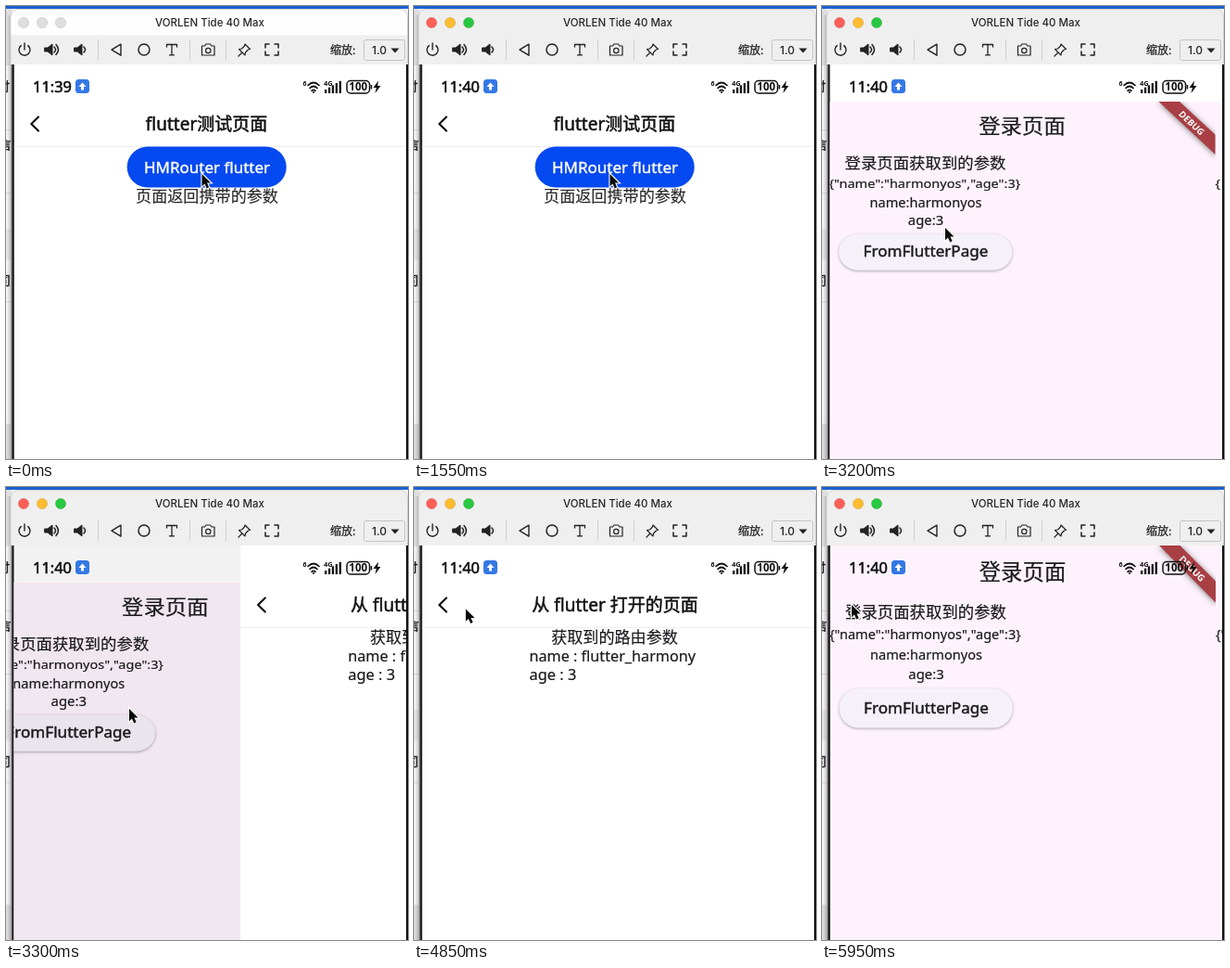
An HTML page with a canvas that plays this animation: 434 by 488 pixels, repeating every 6 s.

```html
<!DOCTYPE html>
<html lang="zh">
<head>
<meta charset="utf-8">
<title>Router demo</title>
<style>
  html, body { margin: 0; width: 100%; height: 100%; overflow: hidden; background: #fff; }
  canvas { display: block; width: 434px; height: 488px; }
</style>
</head>
<body>
<canvas id="stage" width="434" height="488"></canvas>
<script>
const c = document.getElementById('stage').getContext('2d');
const LOOP = 6000, LEFT = 8.5, RIGHT = 432, TOP = 63, W = RIGHT - LEFT;
const SANS = '"Noto Sans", "Noto Sans CJK SC", "Noto Sans CJK", sans-serif';
const UI = 'Inter, "Noto Sans CJK SC", "Noto Sans CJK", sans-serif';
const INK = '#1b1b1d', PINK = '#fef3fd';

const clamp = v => Math.max(0, Math.min(1, v));
const ease = p => p < 0.5 ? 4 * p ** 3 : 1 - (2 - 2 * p) ** 3 / 2;
const span = (t, from, to) => ease(clamp((t - from) / (to - from)));

// heft thickens the letters where the font has no medium weight
function text(s, x, y, size, { color = INK, weight = 400, heft = 0, align = 'left', font = SANS } = {}) {
  c.font = `${weight} ${size}px ${font}`;
  c.fillStyle = c.strokeStyle = color;
  c.textAlign = align;
  c.fillText(s, x, y);
  if (heft) {
    c.lineWidth = heft;
    c.lineJoin = 'round';
    c.strokeText(s, x, y);
  }
}

function rect(x, y, w, h, color) {
  c.fillStyle = color;
  c.fillRect(x, y, w, h);
}

function box(x, y, w, h, r, fill, stroke) {
  c.beginPath();
  c.roundRect(x, y, w, h, r);
  if (fill) { c.fillStyle = fill; c.fill(); }
  if (stroke) { c.strokeStyle = stroke; c.stroke(); }
}

function disc(x, y, r, color, edge) {
  c.beginPath();
  c.arc(x, y, r, 0, 7);
  c.fillStyle = color;
  c.fill();
  if (edge) { c.strokeStyle = edge; c.stroke(); }
}

function path(d, stroke, width = 1.4, fill) {
  const p = new Path2D(d);
  if (fill) { c.fillStyle = fill; c.fill(p); }
  if (stroke) {
    c.strokeStyle = stroke;
    c.lineWidth = width;
    c.stroke(p);
  }
}

function desktop() {
  rect(0, 0, 434, 488, '#f5f5f5');
  rect(0, 0, 434, 3, '#1a62d2');
  rect(0, 3, 6, 61, '#dedede');
  rect(0, 240, 6, 33, '#e6e6e6');
  rect(0, 450, 6, 38, '#dddddd');
  for (const y of [133, 201, 318]) rect(0, y, 5, 1, '#dcdcdc');
  text('时', -9, 91, 13, { heft: 0.4 });
  text('言', -7, 153.5, 13, { heft: 0.4 });
  text('司', -8, 300, 13, { heft: 0.4 });
  const g = c.createLinearGradient(1, 0, 6, 0);
  g.addColorStop(0, 'rgba(0,0,0,0)');
  g.addColorStop(1, 'rgba(0,0,0,.22)');
  rect(1, 10, 5, 478, g);
}

function speaker(x, loud) {
  path(`M${x - 7} 45h3l5-4v12l-5-4h-3z`, '#222', 1, '#222');
  path(`M${x + 3} 44q3 3 0 6`, '#222', 1.5);
  if (loud) path(`M${x + 5} 41.5q5 5.5 0 11`, '#222', 1.5);
}

function toolbar(active) {
  c.lineWidth = 1;
  box(5, 3.5, 428.5, 70, 8, '#f0efef', '#d0d0d0');
  if (!active) box(5.5, 4, 427.5, 27.5, [8, 8, 0, 0], '#fefefe');
  c.lineWidth = 0.8;
  const lights = active ? ['#fe5f57', '#febc2e', '#28c840'] : ['#dedede', '#dedede', '#dedede'];
  lights.forEach((color, i) => disc(19 + 20 * i, 18, 5.7, color, 'rgba(0,0,0,.12)'));
  text('VORLEN Tide 40 Max', 220, 22, 11.5, { weight: 500, align: 'center', font: UI, color: '#262626' });

  c.lineCap = c.lineJoin = 'round';
  path('M16.2 42.6a6 6 0 1 0 7.6 0M20 40v7', '#222');
  speaker(49, true);
  speaker(81, false);
  for (const x of [99, 198, 237]) rect(x, 36, 1, 22, '#cecece');
  path('M114 47.2l10-6v12z', '#222');
  path('M155 47a6 6 0 1 0-12 0a6 6 0 1 0 12 0', '#222', 1.5);
  path('M173.5 44v-2.500h11v2.500M179 41.500v11M176.500 52.800h5', '#222', 1.3);
  path('M211.500 43h3l1.500-2h4.500l1.500 2h3v10h-13.500zM221 48a2.700 2.700 0 1 0-5.400 0a2.700 2.700 0 1 0 5.400 0', '#222', 1.2);
  path('M258 41l5.500 5.500l-2 .5l-3 3l-.5 3l-6.500-6.500l3-.5l3-3zM255 50l-4 4', '#222', 1.2);
  path('M280 45v-4h4M290 41h4v4M294 49v4h-4M284 53h-4v-4', '#222', 1.5);
  text('缩放:', 350, 51.5, 12, { font: UI, color: '#222', heft: 0.25 });
  c.lineWidth = 1;
  box(386.5, 36.5, 44, 22, 2, '#efefef', '#c4c4c4');
  text('1.0', 395, 52, 12, { font: UI, color: '#222', weight: 500 });
  path('M415.500 45.500h9l-4.500 5z', null, 1, '#222');
}

function statusBar(t) {
  text(t < 1500 ? '11:39' : '11:40', 29, 92.5, 16.4, { heft: 0.6, color: '#111' });
  box(75, 79, 15, 15, 3.5, '#3478e5');
  path('M82.500 82.500l4 4.500h-2.500v3.500h-3v-3.500h-2.500z', null, 1, '#fff');

  text('6', 320.5, 85.5, 7, { weight: 700, color: '#111' });
  path('M326 85.500q6-6 12 0M328 88.500q4-4 8 0M330 91.300q2-1.800 4 0', '#111', 1.7);
  disc(332, 93, 1.1, '#111');
  text('4G', 343, 86, 7.5, { weight: 700, color: '#111' });
  for (let i = 0; i < 5; i++) {
    const h = 4 + 2.3 * i;
    rect(344 + 3.9 * i, 94 - h, 2.3, h, '#111');
  }
  c.lineWidth = 1.5;
  box(368, 80.5, 24.5, 13.5, 4, null, '#111');
  rect(393.6, 85, 1.6, 4.5, '#111');
  text('100', 380.2, 91.4, 11.5, { weight: 700, align: 'center', color: '#111' });
  path('M402 80.500l-5.500 7.500h3.300l-1.300 6l6-8h-3.300z', null, 1, '#111');
}

function header(title, center) {
  rect(LEFT, TOP, W, 425, '#fff');
  path('M35 119.500l-7.700 7.500l7.700 7.500', '#111', 2.2);
  text(title, center, 134, 19, { heft: 0.5, align: 'center', color: '#111' });
  rect(LEFT, 151, W, 1, '#eeeeee');
}

function testPage(t) {
  header('flutter测试页面', 216.5);
  box(130.7, 151.6, 172, 43.8, 21.9, t > 950 && t < 1150 ? '#0545e6' : '#0549f0');
  text('HMRouter flutter', 217, 180, 17, { heft: 0.4, align: 'center', color: '#fff' });
  text('页面返回携带的参数', 217, 211, 17.1, { heft: 0.15, align: 'center', color: '#2a2a2a' });
}

function detailPage() {
  header('从 flutter 打开的页面', 217);
  text('获取到的路由参数', 216.5, 168, 17.1, { heft: 0.15, align: 'center' });
  text('name : flutter_harmony', 124.5, 188, 16.2, { heft: 0.2 });
  text('age : 3', 124.5, 208, 16.4, { heft: 0.2 });
}

function debugRibbon() {
  c.save();
  c.beginPath();
  c.rect(LEFT, TOP, 425 - LEFT, 425);
  c.clip();
  c.shadowColor = 'rgba(0,0,0,.5)';
  c.shadowBlur = 6;
  path('M364 63h22.500l40 40v23z', null, 1, '#a83f44');
  c.shadowColor = 'transparent';
  c.translate(399.5, 88);
  c.rotate(Math.PI / 4);
  text('DEBUG', 0, 3.5, 10, { weight: 800, align: 'center', color: '#fff' });
  c.restore();
}

// The surface is squeezed below the status bar while another page covers it.
function loginPage(t, squeezed) {
  rect(LEFT, TOP, W, 425, squeezed ? '#fff' : PINK);
  c.save();
  if (squeezed) {
    c.translate(0, 103);
    c.scale(1, 0.925);
    c.translate(0, -TOP);
    rect(LEFT, TOP, W, 460, PINK);
  }
  const mid = { align: 'center', heft: 0.2 };
  text('登录页面', 216.5, 100, 23.4, mid);
  text('登录页面获取到的参数', 112, 141, 17.4, mid);
  const json = '{"name":"harmonyos","age":3}';
  text(json, 8, 164, 14.5, { heft: 0.2 });
  text(json, 425, 164, 14.5, { heft: 0.2 });
  text('name:harmonyos', 112.5, 186, 14.6, mid);
  text('age:3', 112.5, 207, 14.9, mid);
  c.shadowColor = 'rgba(0,0,0,.32)';
  c.shadowBlur = 3;
  c.shadowOffsetY = 1;
  box(18.5, 217, 187.5, 42.5, 21.25, '#f6f0f9');
  c.shadowColor = 'transparent';
  text('FromFlutterPage', 112.5, 244, 17.1, { heft: 0.45, align: 'center' });
  debugRibbon();
  c.restore();
}

function shifted(dx, draw) {
  c.save();
  c.translate(dx, 0);
  draw();
  c.restore();
}

// k = 0 shows only the lower page, k = 1 only the upper one.
function stack(lower, upper, k) {
  if (k < 1) {
    shifted(-0.25 * W * k, lower);
    if (k > 0) rect(LEFT, TOP, W, 425, `rgba(0,0,0,${0.12 * k})`);
  }
  if (k > 0) shifted(W * (1 - k), upper);
}

function pages(t) {
  c.save();
  c.beginPath();
  c.rect(LEFT, TOP, W, 425);
  c.clip();
  if (t < 3150) {
    stack(() => testPage(t), () => loginPage(t, false), span(t, 1900, 2260));
  } else {
    const k = t < 5000 ? span(t, 3172, 3445) : 1 - span(t, 5440, 5740);
    stack(() => loginPage(t, t < 5000), detailPage, k);
  }
  statusBar(t);
  c.restore();
}

// Start time, end time, x, y of each pointer move
const MOVES = [
  [1950, 2250, 203.5, 196],
  [2550, 3000, 133, 239],
  [4150, 4700, 53.5, 131],
  [4800, 4900, 58, 132],
  [4900, 5100, 32, 127]
];
const ARROW = 'M0 0v13.200l3-2.800l2.200 5l2.500-1.100l-2.200-4.800h4.100z';

function pointer(t) {
  let x = 211.5, y = 181;
  for (const [from, to, nx, ny] of MOVES) {
    const k = span(t, from, to);
    x += (nx - x) * k;
    y += (ny - y) * k;
  }
  c.save();
  c.translate(x, y);
  c.lineJoin = 'miter';
  path(ARROW, '#fff', 2.2);
  path(ARROW, null, 1, '#0a0a0a');
  c.restore();
}

function draw(t) {
  desktop();
  toolbar(t >= 50);
  rect(5, TOP, 429, 425, '#111');
  rect(5, TOP, 1.5, 425, '#a0a0a0');
  pages(t);
  pointer(t);
}

const start = performance.now();
function tick() {
  draw((performance.now() - start) % LOOP);
  requestAnimationFrame(tick);
}
tick();
</script>
</body>
</html>
```
